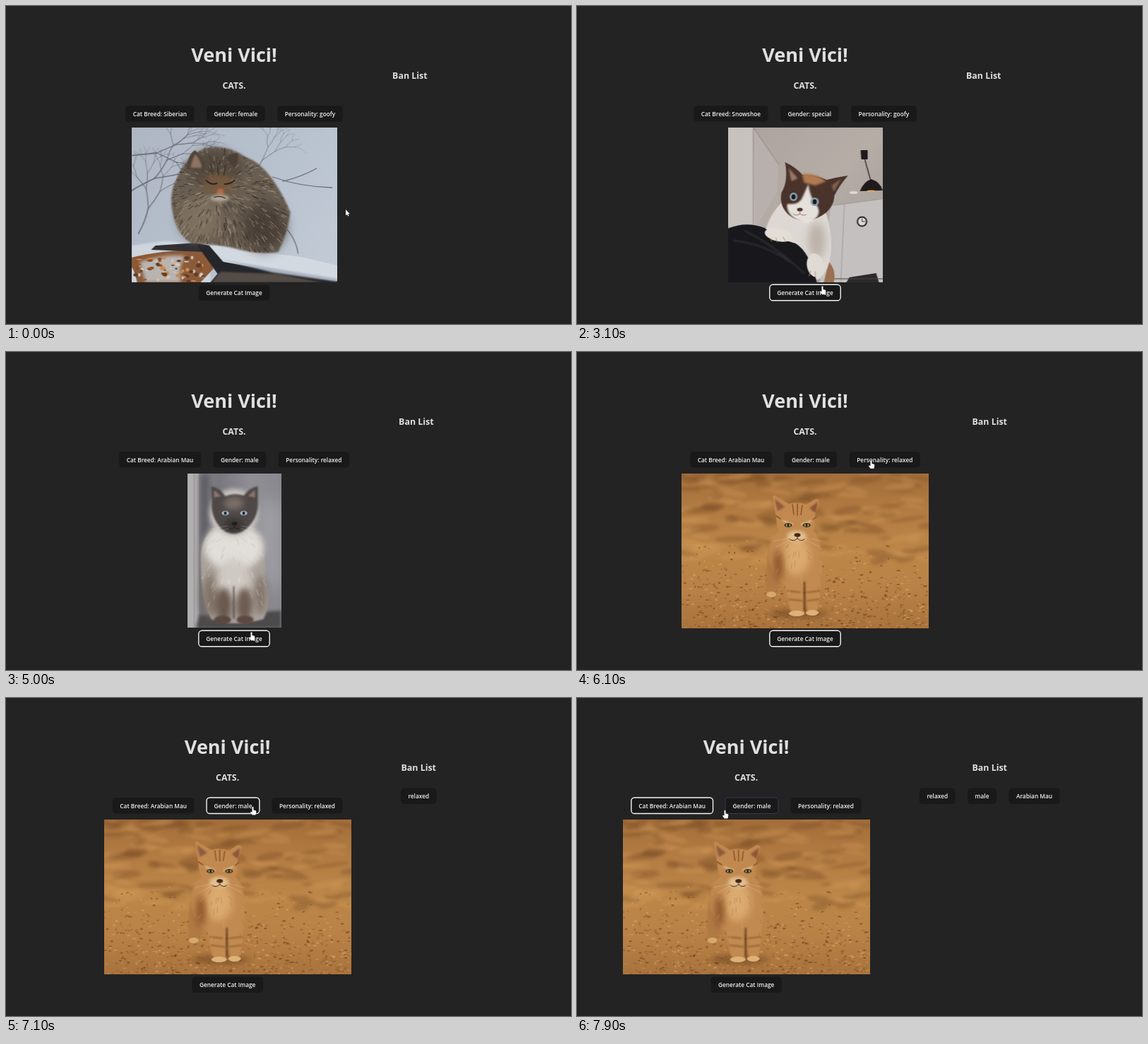
An HTML page with a canvas for the animation above (8 s loop, 800 by 450 pixels).

```html
<!DOCTYPE html>
<html lang="en">
<head>
<meta charset="utf-8">
<title>Cats</title>
<style>
  html, body { margin: 0; width: 100%; height: 100%; overflow: hidden; background: #232323; }
  canvas { display: block; width: 800px; height: 450px; }
</style>
</head>
<body>
<canvas id="stage"></canvas>
<script>
const LOOP = 8000, STEP = 100;
const FONT = '"Open Sans", "Noto Sans", sans-serif';
const BUTTON_FONT = `600 8.3px ${FONT}`;
const GAP = 17.5, PAD = 10.5, BTN_H = 22.5;

const dpr = window.devicePixelRatio || 1;
const canvas = document.getElementById('stage');
canvas.width = 800 * dpr;
canvas.height = 450 * dpr;
const ctx = canvas.getContext('2d');

function seeded(seed) {
  return () => (seed = (seed * 16807) % 2147483647) / 2147483647;
}

// ---------- pictures ----------

function fill(g, color, d, blur = 0.5) {
  g.filter = blur ? `blur(${blur}px)` : 'none';
  g.fillStyle = color;
  g.fill(new Path2D(d));
  g.filter = 'none';
}

function line(g, color, width, d, blur = 0) {
  g.filter = blur ? `blur(${blur}px)` : 'none';
  g.strokeStyle = color;
  g.lineWidth = width;
  g.lineCap = 'round';
  g.stroke(new Path2D(d));
  g.filter = 'none';
}

function oval(g, color, x, y, rx, ry, blur = 0.5, turn = 0) {
  g.filter = blur ? `blur(${blur}px)` : 'none';
  g.fillStyle = color;
  g.beginPath();
  g.ellipse(x, y, rx, ry, turn, 0, Math.PI * 2);
  g.fill();
  g.filter = 'none';
}

function backdrop(g, w, h, x2, y2, ...colors) {
  const grad = g.createLinearGradient(0, 0, x2, y2);
  colors.forEach((c, i) => grad.addColorStop(i / (colors.length - 1), c));
  g.fillStyle = grad;
  g.fillRect(0, 0, w, h);
}

// Short strokes radiating from a centre, clipped to a shape.
function fur(g, d, cx, cy, reach, count, colors, seed) {
  const rnd = seeded(seed);
  g.save();
  g.clip(new Path2D(d));
  g.lineWidth = 0.9;
  for (let i = 0; i < count; i++) {
    const a = rnd() * Math.PI * 2, r = Math.sqrt(rnd()) * reach, len = 3 + rnd() * 5;
    const x = cx + Math.cos(a) * r, y = cy + Math.sin(a) * r;
    g.strokeStyle = colors[Math.floor(rnd() * colors.length)];
    g.beginPath();
    g.moveTo(x, y);
    g.lineTo(x + Math.cos(a) * len, y + Math.sin(a) * len + 1.5);
    g.stroke();
  }
  g.restore();
}

function branch(g, rnd, x, y, a, len, width) {
  if (len < 8) return;
  const x2 = x + Math.cos(a) * len, y2 = y + Math.sin(a) * len;
  line(g, '#62636acc', width, `M${x} ${y}Q${(x + x2) / 2 + rnd() * 6 - 3} ${(y + y2) / 2} ${x2} ${y2}`);
  branch(g, rnd, x2, y2, a + 0.15 + rnd() * 0.45, len * 0.78, width * 0.75);
  branch(g, rnd, x2, y2, a - 0.15 - rnd() * 0.5, len * 0.74, width * 0.75);
}

function snowCat(g, w, h) {
  backdrop(g, w, h, w, h, '#aeb6c2', '#b7c1ce', '#c3ccd6');
  const rnd = seeded(41);
  branch(g, rnd, -4, 92, -0.5, 42, 2);
  branch(g, rnd, -4, 40, -0.1, 40, 1.8);
  branch(g, rnd, 10, 150, -1.2, 38, 1.8);
  branch(g, rnd, 170, 70, -1.0, 28, 1.2);
  line(g, '#6b6d74', 1.3, 'M200 70Q240 84 284 85M215 76Q240 70 262 58M205 130Q232 150 236 178');
  fill(g, '#cfd5dd', 'M0 167L50 160L110 168L112 219H0Z', 1);
  fill(g, '#8b5a39', 'M0 184Q40 174 98 172Q112 180 116 200L98 219H8Q4 200 0 198Z');
  fill(g, '#b9b4b0', 'M12 190Q50 178 76 182Q66 198 70 219H20Z', 2);
  const spots = ['#8a4f2a', '#c98a50', '#cdc8c4', '#5e3c2a'];
  for (let i = 0; i < 70; i++) {
    oval(g, spots[i % 4], 6 + rnd() * 96, 184 + rnd() * 34, 1 + rnd() * 3, 1 + rnd() * 2, 0);
  }
  fill(g, '#303034', 'M34 167L94 163L112 168L104 176L28 173Z');
  fill(g, '#25262a', 'M92 165L112 167L134 190L291 214V219H112L122 207Z');
  fill(g, '#544c47', 'M126 204L206 207L270 219H114Z', 1);
  fill(g, '#d3d9e1', 'M110 167Q140 166 180 176L240 183L291 195V217L205 203L130 190Z');
  fill(g, '#aab3c0', 'M126 187L205 200L291 214V218L200 205Z', 1);

  const body = 'M62 78C50 98 58 150 86 164Q120 164 150 172Q180 180 208 176Q222 146 225 120C214 92 190 50 162 42Q134 22 104 30Q74 42 62 78Z';
  fill(g, '#695e51', body, 1.2);
  oval(g, '#7d705f', 96, 128, 30, 32, 7);
  oval(g, '#4a4038', 188, 140, 30, 34, 8);
  oval(g, '#554a40', 118, 58, 38, 26, 6);
  fur(g, body, 122, 92, 110, 1500, ['#453b33', '#83766500', '#93866f', '#5c5146', '#a39680', '#372f2a'], 7);
  fill(g, '#514439', 'M78 59Q80 38 90 32Q102 42 105 58Z');
  fill(g, '#8d7361', 'M84 57Q86 43 91 38Q98 46 100 57Z', 1);
  fill(g, '#4c4036', 'M134 44Q142 34 151 37Q152 48 146 57Z');
  oval(g, '#74593f', 124, 80, 22, 14, 5);
  line(g, '#2b241f', 2, 'M106 75Q113 82 121 79M132 80Q140 80 146 75', 0.4);
  line(g, '#352c26', 1.3, 'M112 52L114 66M122 50L123 67M133 53L131 67', 0.4);
  oval(g, '#b86a45', 126, 91, 5, 5, 1.4);
  oval(g, '#b3a999', 125, 100, 13, 5, 2);
  line(g, '#3b2c25', 1.2, 'M117 99Q125 96 133 100');
  line(g, '#c8c1b566', 0.6, 'M116 98L92 106M116 100L96 114M134 100L156 110M134 98L160 101');
}

function jacketCat(g, w, h) {
  backdrop(g, w, h, w, h, '#aaa29c', '#b6ada7', '#9f9894');
  fill(g, '#c8c2bf', 'M0 0H36L40 148L0 140Z');
  fill(g, '#b8b0ac', 'M36 0L72 52L70 90L38 146Z');
  line(g, '#8f8782', 1, 'M36 0V140M36 0L72 52');
  fill(g, '#c3c0bf', 'M146 111L219 101V219H130Z');
  line(g, '#a29b98', 1, 'M150 110L219 101M165 108L160 219');
  line(g, '#201d1c', 1.2, 'M192 38L202 74');
  fill(g, '#1d1b1b', 'M188 32H198V45H189Z', 0.3);
  fill(g, '#1e1b1a', 'M187 90Q192 77 203 73Q216 77 219 89Z', 0.3);
  oval(g, '#d8a66d', 203, 90, 6, 1.6);
  oval(g, '#ded8d1', 178, 92, 6, 2);
  oval(g, '#282626', 190, 133, 7.5, 7.5, 0.3);
  oval(g, '#dcdad7', 190, 133, 5.5, 5.5, 0.3);
  line(g, '#282626', 0.9, 'M190 129V133H194');
  fill(g, '#2b292a', 'M172 212L210 206L214 219H168Z');
  line(g, '#4a4442', 1, 'M148 214H219');

  fill(g, '#9a7051', 'M143 190Q154 202 150 219H136Z');
  fill(g, '#ddd8d3', 'M78 104Q58 124 52 150L70 164L108 182L120 214Q132 220 142 196Q152 166 140 124L128 106Z', 0.7);
  oval(g, '#bcb2aa', 126, 160, 12, 26, 6);
  const head = 'M81 49Q96 56 106 67Q124 66 140 74Q156 70 170 68Q158 82 151 96Q150 114 134 124Q108 140 88 125Q72 112 76 92Q86 76 81 49Z';
  fill(g, '#49332a', head);
  fill(g, '#b07b50', 'M105 66Q124 63 139 76L124 82L108 78Z', 1.5);
  fill(g, '#9a7969', 'M86 57L99 72L90 76Z', 1);
  fill(g, '#80624f', 'M161 72L147 82L150 91Z', 1);
  fill(g, '#e6e0da', 'M114 80Q116 98 126 110Q136 126 112 136Q82 128 84 108Q102 110 106 98Z', 0.8);
  oval(g, '#879ead', 93, 98, 5.6, 6, 0.4);
  oval(g, '#879ead', 123, 105, 6, 6, 0.4);
  oval(g, '#15171a', 93, 98, 2.8, 3.6, 0.3);
  oval(g, '#15171a', 123, 105, 2.8, 3.6, 0.3);
  oval(g, '#4b3029', 102, 116, 4, 2.6);
  line(g, '#7a6058', 0.8, 'M102 118V122Q97 126 93 122M102 122Q108 126 111 123');

  fill(g, '#18181c', 'M0 143Q26 132 52 142Q70 158 96 164Q116 176 126 219H0Z');
  line(g, '#303036', 2, 'M8 160Q50 164 88 190M24 146Q64 166 108 206', 1);
  oval(g, '#e3ddd6', 72, 152, 20, 9, 0.6, 0.2);
  oval(g, '#e0dad4', 124, 195, 12, 17, 0.6, -0.2);
  line(g, '#a48f83', 0.9, 'M60 156L62 161M68 156L70 162M78 155L82 161M117 203L115 210M124 204L124 212');
}

function sittingCat(g, w, h) {
  backdrop(g, w, h, w, 0, '#99989c', '#77777d', '#8f8f95', '#88888e');
  fill(g, '#b1afaf', 'M0 0H17V219H0Z');
  line(g, '#8f8d8f', 1, 'M10 0V219M17 0V219');
  fill(g, '#5d5d63', 'M18 0H32L26 200H18Z', 4);
  fill(g, '#a3a3a9', 'M100 40H133V160H110Z', 14);
  fill(g, '#4c4a4b', 'M17 200L133 194V219H12Z', 2);
  const body = 'M40 76Q16 92 19 130Q20 180 34 206Q66 218 108 206Q120 182 110 150Q112 118 106 88Z';
  fill(g, '#aaa29b', body, 1);
  oval(g, '#837569', 36, 172, 15, 30, 6);
  oval(g, '#85786e', 104, 172, 9, 28, 5);
  oval(g, '#e1ddd8', 66, 104, 42, 34, 5);
  oval(g, '#cfc9c3', 66, 150, 25, 28, 6);
  fur(g, body, 66, 85, 112, 360, ['#f1eeea70', '#b4aaa270', '#d9d3cd70'], 19);
  oval(g, '#6b594f', 52, 186, 11, 24, 4);
  oval(g, '#6e5c51', 81, 186, 11, 24, 4);
  oval(g, '#59483f', 50, 207, 12, 6, 1);
  oval(g, '#5c4a41', 82, 207, 12, 6, 1);
  line(g, '#342d2b', 1.4, 'M66 160V205', 1);
  oval(g, '#cec9c4', 66, 56, 34, 34, 3);
  fill(g, '#4e4847', 'M35 38L34 18Q46 20 54 32Q66 27 80 31Q90 19 100 18L100 38Q102 62 84 78Q66 92 48 78Q32 60 35 38Z', 0.8);
  fill(g, '#8c7470', 'M38 34V23L48 32Z', 1);
  fill(g, '#8c7470', 'M96 34V23L86 32Z', 1);
  oval(g, '#7c7069', 66, 42, 14, 9, 4);
  oval(g, '#3b3534', 66, 73, 14, 10, 3);
  for (const x of [54, 80]) {
    oval(g, '#a7bccd', x, 56, 5, 3.3, 0.4);
    oval(g, '#17191c', x, 56, 1.8, 2.6, 0.3);
  }
  oval(g, '#201d1d', 67, 71, 4, 2.4);
  line(g, '#211e1e', 0.9, 'M67 72V76Q62 80 59 77M67 76Q72 80 75 77');
  line(g, '#e8e4e066', 0.6, 'M58 74L34 78M59 77L36 87M76 74L98 78M75 77L96 87');
}

function sandCat(g, w, h) {
  backdrop(g, w, h, 0, h, '#a36e3a', '#b37c43', '#bd8749', '#b98146', '#a8733d');
  const rnd = seeded(97);
  for (let i = 0; i < 130; i++) {
    const y = rnd() * 125;
    oval(g, i % 2 ? '#754a2455' : '#d19b5c55', rnd() * w, y, 8 + rnd() * 22, 2 + rnd() * 4, 2, 0.25 - rnd() * 0.5);
  }
  for (let i = 0; i < 700; i++) {
    const y = 95 + Math.sqrt(rnd()) * 124;
    oval(g, ['#69401f99', '#dba76788', '#8d5d3099'][i % 3], rnd() * w, y, 0.6 + rnd() * 2, 0.5 + rnd(), 0);
  }
  oval(g, '#68401f99', 165, 198, 42, 6, 4);
  fill(g, '#b17a45', 'M126 100Q116 140 121 170Q130 178 136 166L142 130Z', 0.8);
  oval(g, '#d7a86c', 127, 171, 7, 4);
  const body = 'M142 78Q120 92 124 126Q130 146 146 158L153 192Q160 202 174 198L172 162L176 160L178 196Q188 202 194 190L198 148Q204 104 188 82Z';
  fill(g, '#c18a50', body, 0.8);
  oval(g, '#dbaa6f', 162, 116, 20, 28, 6);
  oval(g, '#91592e', 137, 130, 7, 22, 5);
  line(g, '#8a552d', 1.6, 'M150 166L168 168M152 178L171 180M178 168L196 166M178 180L194 178', 1);
  fur(g, body, 162, 90, 110, 240, ['#e0b57b66', '#96623666'], 23);
  oval(g, '#dcb279', 163, 198, 11, 4);
  oval(g, '#dcb279', 185, 197, 9, 4);
  line(g, '#5b351b', 2, 'M174 154V194', 1.3);
  fill(g, '#c18950', 'M134 63L129 33Q130 28 135 33L152 43Q164 39 176 44L190 36Q196 36 195 42L188 62Q192 82 176 92Q162 102 148 92Q134 80 134 63Z');
  fill(g, '#8d5b40', 'M136 53L132 36L146 47Z', 1);
  fill(g, '#8d5539', 'M190 56L193 40L181 49Z', 1);
  line(g, '#8e572c', 1.6, 'M157 44L159 58M164 43V59M171 45L169 58M140 64L134 60M186 65L191 61', 0.5);
  oval(g, '#e5c190', 163, 89, 14, 8, 2.5);
  line(g, '#e5c18a', 2.2, 'M144 67L157 72M170 72L183 67', 0.8);
  for (const x of [151, 177]) {
    oval(g, '#35291b', x, 73, 5.5, 3, 0.4);
    oval(g, '#a5a064', x, 73, 3.5, 2, 0.3);
    oval(g, '#17130e', x, 73, 1.4, 2, 0.2);
  }
  oval(g, '#43271e', 164, 87, 4.5, 2.8);
  line(g, '#50301f', 1, 'M164 89V92Q158 97 153 93M164 92Q170 97 174 93');
  line(g, '#f0d9b477', 0.6, 'M154 90L130 96M154 93L134 104M175 90L198 96M174 93L195 103');
}

function photo(w, h, draw) {
  const img = document.createElement('canvas');
  img.width = w * dpr;
  img.height = h * dpr;
  const g = img.getContext('2d');
  g.scale(dpr, dpr);
  draw(g, w, h);
  return { img, w, h };
}

const photos = {
  snow: photo(291, 219, snowCat),
  jacket: photo(219, 219, jacketCat),
  sitting: photo(133, 218, sittingCat),
  sand: photo(350, 219, sandCat)
};

// ---------- timeline ----------

const changes = [
  [0, { breed: 'Siberian', gender: 'female', mood: 'goofy', pic: 'snow', bans: [], focus: '', hover: false }],
  [1700, { focus: 'generate' }],
  [1800, { gender: 'special' }],
  [2100, { breed: 'Snowshoe' }],
  [2200, { pic: 'jacket' }],
  [3200, { mood: 'relaxed' }],
  [3500, { breed: 'Siberian', gender: 'male' }],
  [3700, { pic: 'sitting' }],
  [4500, { breed: 'Snowshoe' }],
  [4900, { breed: 'Arabian Mau' }],
  [5500, { pic: 'sand' }],
  [6300, { focus: 'mood' }],
  [6400, { bans: ['relaxed'] }],
  [7100, { focus: 'gender' }],
  [7200, { bans: ['relaxed', 'male'] }],
  [7700, { focus: 'breed' }],
  [7800, { bans: ['relaxed', 'male', 'Arabian Mau'] }],
  [7900, { hover: true }]
];

// start, end, from, bend, to
const moves = [
  [900, 1700, [481, 288], [420, 470], [347.5, 396]],
  [5500, 6100, [347.5, 396], [400, 270], [416.5, 153]],
  [6400, 7000, [416.5, 153], [385, 158], [349.5, 153.5]],
  [7200, 7700, [349.5, 153.5], [280, 162], [209.5, 158.5]]
];

function stateAt(t) {
  return Object.assign({}, ...changes.filter(c => c[0] <= t).map(c => c[1]));
}

function pointerAt(t) {
  const [t0, t1, a, b, c] = moves.filter(m => m[0] <= t).pop() || moves[0];
  const k = Math.min(1, Math.max(0, (t - t0) / (t1 - t0)));
  const p = k * k * (3 - 2 * k), q = 1 - p;
  return [0, 1].map(i => q * q * a[i] + 2 * p * q * b[i] + p * p * c[i]);
}

// ---------- page ----------

function text(str, x, y, font, color = '#e0e0e0') {
  ctx.font = font;
  ctx.fillStyle = color;
  ctx.textAlign = 'center';
  ctx.fillText(str, x, y);
}

function buttonWidth(label) {
  ctx.font = BUTTON_FONT;
  return ctx.measureText(label).width + PAD * 2;
}

function rowWidth(labels) {
  return labels.reduce((sum, s) => sum + buttonWidth(s) + GAP, 0);
}

function outline(x, y, w, color, width) {
  ctx.beginPath();
  ctx.roundRect(x, y, w, BTN_H, 4.6);
  ctx.strokeStyle = color;
  ctx.lineWidth = width;
  ctx.stroke();
}

function button(label, x, y, focused, hovered) {
  const w = buttonWidth(label);
  ctx.beginPath();
  ctx.roundRect(x, y, w, BTN_H, 4.6);
  ctx.fillStyle = '#191919';
  ctx.fill();
  if (hovered) outline(x, y, w, '#3c3e68', 0.8);
  if (focused) outline(x, y, w, '#f4f4f4', 1.4);
  text(label, x + w / 2, y + 14.6, BUTTON_FONT, '#f0f0f0');
  return { x, y, w };
}

function buttonRow(labels, cx, y, focus = -1, hover = -1) {
  let x = cx - rowWidth(labels) / 2 + GAP / 2;
  return labels.map((label, i) => {
    const box = button(label, x, y, i === focus, i === hover);
    x += box.w + GAP;
    return box;
  });
}

function pointer(x, y, hand) {
  ctx.save();
  ctx.translate(x, y);
  const shape = new Path2D(hand
    ? 'M-1 1Q0 -.6 1 1V5L4 5.8Q5 6.2 4.8 8L4 12H-.8L-3.6 8.4Q-3.4 7 -1 8Z'
    : 'M0 0V8.6L2 6.8L3.3 9.6L4.6 9L3.4 6.3H6Z');
  ctx.strokeStyle = '#111';
  ctx.lineWidth = 0.8;
  ctx.stroke(shape);
  ctx.fillStyle = '#fff';
  ctx.fill(shape);
  ctx.restore();
}

function draw(t) {
  const s = stateAt(t), pic = photos[s.pic];
  const labels = [`Cat Breed: ${s.breed}`, `Gender: ${s.gender}`, `Personality: ${s.mood}`];
  const headFont = `700 12.4px ${FONT}`;

  // Two columns, centred together; each is as wide as its widest content.
  ctx.font = headFont;
  const banW = Math.max(ctx.measureText('Ban List').width, rowWidth(s.bans));
  const mainW = Math.max(rowWidth(labels), pic.w);
  const left = 378.5 - (mainW + 61.5 + banW) / 2;
  const cx = left + mainW / 2, banX = left + mainW + 61.5 + banW / 2;

  ctx.setTransform(dpr, 0, 0, dpr, 0, 0);
  ctx.fillStyle = '#232323';
  ctx.fillRect(0, 0, 800, 450);
  text('Veni Vici!', cx, 79, `700 27px ${FONT}`);
  text('CATS.', cx, 116.6, headFont);
  text('Ban List', banX, 102.6, headFont);

  const focus = ['breed', 'gender', 'mood'].indexOf(s.focus);
  const boxes = buttonRow(labels, cx, 141, focus, s.hover ? 1 : -1);
  buttonRow(s.bans, banX, 127.5);
  ctx.drawImage(pic.img, cx - pic.w / 2, 172, pic.w, pic.h);
  const generate = 'Generate Cat Image';
  boxes.push(button(generate, cx - buttonWidth(generate) / 2, 394.3, s.focus === 'generate'));

  const [px, py] = pointerAt(t);
  const over = boxes.some(b => px > b.x - 2 && px < b.x + b.w && py > b.y && py < b.y + BTN_H);
  pointer(px, py, over);
}

function tick(now) {
  draw(Math.floor((now % LOOP) / STEP) * STEP);
  requestAnimationFrame(tick);
}
requestAnimationFrame(tick);
</script>
</body>
</html>
```
